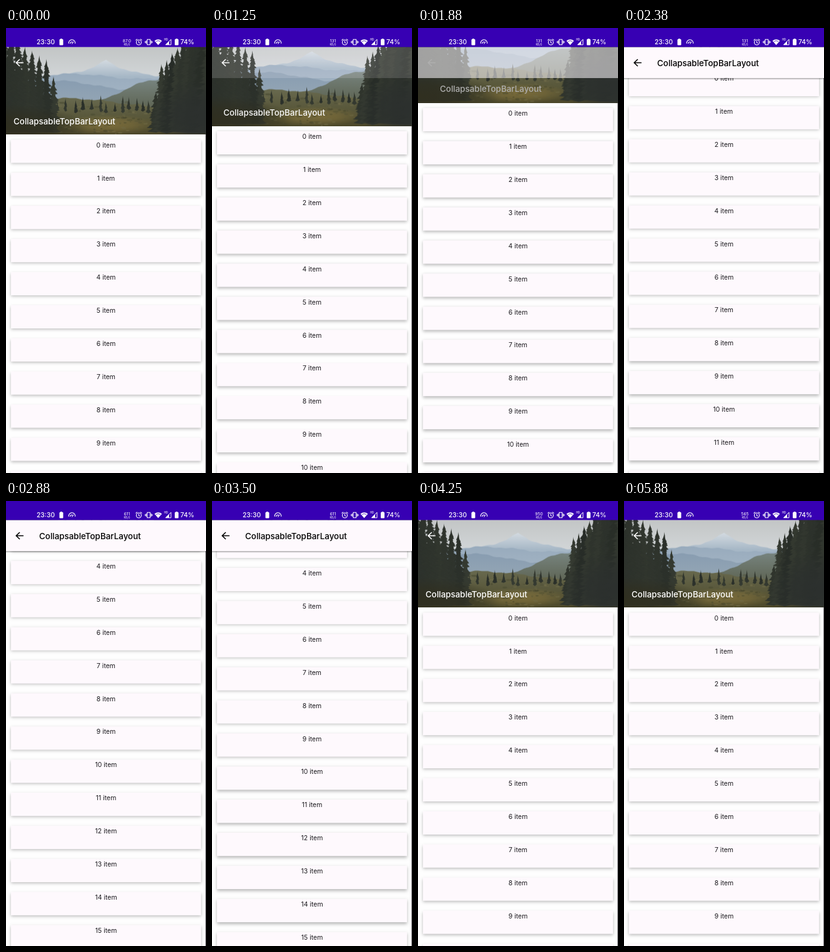
An HTML page with a canvas for the animation above (6.01 s loop, 320 by 711 pixels).

```html
<!DOCTYPE html>
<html lang="en">
<head>
<meta charset="utf-8">
<title>Collapsing top bar</title>
<style>
html, body { margin: 0; width: 100%; height: 100%; overflow: hidden; background: #fff; }
canvas { display: block; width: 100vw; height: 100vh; }
</style>
</head>
<body>
<canvas id="stage"></canvas>
<script>
const W = 320, H = 711, LOOP = 6010, TICK = 125;
const STATUS_H = 30.4, BAR_BOTTOM = 80, HEADER_BOTTOM = 170, RANGE = HEADER_BOTTOM - BAR_BOTTOM;
const PITCH = 52.9, SURFACE = '#fef9fd', PURPLE = '#3700b3', WHITE = '#fff';
const FONT = 'Inter, Roboto, sans-serif';
const TAU = Math.PI * 2;

const canvas = document.getElementById('stage');
const scale = Math.max(1, window.devicePixelRatio || 1);
canvas.width = W * scale;
canvas.height = H * scale;
const ctx = canvas.getContext('2d');

const lerp = (a, b, u) => a + (b - a) * u;
const smooth = u => u * u * (3 - 2 * u);
const progress = (tick, from, to) => Math.min(1, Math.max(0, (tick - from) / (to - from)));

// Slow drag after a touch jump, a fling down the list, then a fling back to the top.
function scrollAt(tick) {
  if (tick < 10) return 0;
  const drag = lerp(13.5, 50.5, progress(tick, 10, 15)) + 56 * progress(tick, 15, 19);
  const down = lerp(drag, 316, smooth(progress(tick, 19, 24)));
  return lerp(down, 0, smooth(progress(tick, 27, 32)));
}

function speedAt(tick) {
  return tick < 3 ? '87.0' : tick < 20 ? '131' : tick < 33 ? '611' : tick < 46 ? '950' : '565';
}

function seeded(seed) {
  return () => (seed = (seed * 16807) % 2147483647) / 2147483647;
}

function text(str, x, y, size, color, weight = 400, align = 'left') {
  ctx.font = `${weight} ${size}px ${FONT}`;
  ctx.textAlign = align;
  ctx.fillStyle = color;
  ctx.fillText(str, x, y);
}

function stroke(color, width, trace) {
  ctx.strokeStyle = color;
  ctx.lineWidth = width;
  ctx.beginPath();
  trace();
  ctx.stroke();
}

function line(...xy) {
  ctx.moveTo(xy[0], xy[1]);
  for (let i = 2; i < xy.length; i += 2) ctx.lineTo(xy[i], xy[i + 1]);
}

function fade(c, y0, y1, top, bottom) {
  const g = c.createLinearGradient(0, y0, 0, y1);
  g.addColorStop(0, top);
  g.addColorStop(1, bottom);
  return g;
}

function ridge(c, fill, height) {
  c.fillStyle = fill;
  c.beginPath();
  c.moveTo(0, HEADER_BOTTOM);
  for (let x = 0; x <= W; x += 2) {
    c.lineTo(x, height(x) + Math.sin(x / 9) * 0.9 + Math.sin(x / 3.1) * 0.5);
  }
  c.lineTo(W, HEADER_BOTTOM);
  c.fill();
}

function glow(c, x, y, rx, ry, rgb, alpha) {
  c.save();
  c.translate(x, y);
  c.scale(rx, ry);
  const g = c.createRadialGradient(0, 0, 0, 0, 0, 1);
  g.addColorStop(0, `rgba(${rgb},${alpha})`);
  g.addColorStop(0.5, `rgba(${rgb},${alpha * 0.7})`);
  g.addColorStop(1, `rgba(${rgb},0)`);
  c.fillStyle = g;
  c.fillRect(-1, -1, 2, 2);
  c.restore();
}

function conifer(c, rnd, x, top, base, spread) {
  const shade = rnd() * 14;
  c.fillStyle = `rgb(${40 + shade},${45 + shade},${40 + shade * 0.7})`;
  for (let y = top; y < base; y += 3) {
    const w = spread * Math.pow((y - top) / (base - top), 0.6) + 1;
    const l = w * lerp(0.5, 1.15, rnd()), r = w * lerp(0.5, 1.15, rnd());
    c.beginPath();
    c.moveTo(x, y - 3);
    c.lineTo(x + r, y + 3 + rnd() * 2);
    c.lineTo(x, y + 6);
    c.lineTo(x - l, y + 3 + rnd() * 2);
    c.fill();
  }
}

// A row of trees growing taller from the clearing towards the picture's edge.
function grove(c, rnd, count, inner, outer, low, high, spread) {
  for (let i = 0; i < count; i++) {
    const u = i / (count - 1);
    const top = lerp(low, high, Math.sqrt(u)) + (rnd() - 0.5) * 12;
    conifer(c, rnd, lerp(inner, outer, u), top, 162, spread * lerp(0.6, 1.2, u));
  }
}

// Landscape in soft tones behind the expanded header.
function paintScene() {
  const layer = document.createElement('canvas');
  layer.width = W * scale;
  layer.height = (HEADER_BOTTOM - STATUS_H) * scale;
  const c = layer.getContext('2d');
  c.scale(scale, scale);
  c.translate(0, -STATUS_H);
  const rnd = seeded(71);

  c.fillStyle = fade(c, 31, 80, '#c3c6c6', '#d2d6d8');
  c.fillRect(0, 0, W, HEADER_BOTTOM);
  ridge(c, fade(c, 51, 78, '#d3dae0', '#a6b7c6'), x => 80 - 29 * Math.exp(-Math.abs(x - 160) / 42));
  ridge(c, fade(c, 72, 105, '#98abbd', '#a2b3c3'), x => 77 + 4 * Math.cos(x / 34));
  ridge(c, fade(c, 85, 122, '#899db1', '#94a6b5'), x => 91 + 7 * Math.cos(x / 38 + 1));
  ridge(c, fade(c, 82, 122, '#77847f', '#62695a'), x => 122 - 40 * smooth(progress(x, 120, 245)));
  ridge(c, fade(c, 115, 170, '#66674c', '#4c4829'), x => 120 - 8 * Math.sin(x / 60));
  glow(c, 165, 154, 75, 16, '140,120,62', 0.65);

  for (let i = 0; i < 130; i++) {
    const y = lerp(118, 170, rnd()), light = rnd();
    c.fillStyle = `rgba(${lerp(52, 130, light)},${lerp(55, 124, light)},${lerp(35, 84, light)},.4)`;
    c.beginPath();
    c.ellipse(lerp(70, 260, rnd()), y, 1 + rnd() * 4, 0.6 + rnd() * 1.2, 0, 0, TAU);
    c.fill();
  }
  for (let x = 82; x < 250; x += 5 + rnd() * 13) {
    const base = 125 + rnd() * 6;
    conifer(c, rnd, x, base - 6 - rnd() * 14, base, 3);
  }

  grove(c, rnd, 8, 76, -4, 84, 12, 20);
  grove(c, rnd, 11, 240, 326, 100, -12, 23);
  glow(c, 5, 160, 125, 38, '48,47,32', 1);
  glow(c, 315, 140, 85, 58, '44,48,46', 1);
  return layer;
}

const scene = paintScene();

function drawList(scroll) {
  ctx.fillStyle = '#fefefe';
  ctx.fillRect(0, STATUS_H, W, H - STATUS_H);
  for (let i = 0; i < 20; i++) {
    const top = 178.3 + i * PITCH - scroll;
    if (top < 20 || top > H + 10) continue;
    ctx.save();
    ctx.shadowColor = 'rgba(0,0,0,.27)';
    ctx.shadowBlur = 5 * scale;
    ctx.shadowOffsetY = (1.2 + 1.6 * top / H) * scale;
    ctx.fillStyle = SURFACE;
    ctx.fillRect(8, top, 304, 37.2);
    ctx.restore();
    text(`${i} item`, W / 2, top + 12.3, 10.5, '#1c1b1f', 400, 'center');
  }
  ctx.fillStyle = '#77757a';
  ctx.fillRect(319, STATUS_H, 1, H - STATUS_H);
}

function drawHeader(scroll) {
  const p = Math.min(1, scroll / RANGE), shift = p * RANGE;

  if (p === 1) {
    ctx.fillStyle = fade(ctx, BAR_BOTTOM, BAR_BOTTOM + 3, 'rgba(0,0,0,.35)', 'rgba(0,0,0,0)');
    ctx.fillRect(0, BAR_BOTTOM, W, 3);
  }

  ctx.drawImage(scene, 0, STATUS_H - shift, W, HEADER_BOTTOM - STATUS_H);
  ctx.globalAlpha = p;
  ctx.fillStyle = SURFACE;
  ctx.fillRect(0, STATUS_H, W, BAR_BOTTOM - STATUS_H);
  ctx.globalAlpha = 1;

  const v = Math.round(255 * (1 - p * p));
  const ink = `rgb(${v},${v},${v})`;
  stroke(ink, 1.6, () => {
    line(28, 55.5, 16.5, 55.5);
    line(22, 50, 16.3, 55.5, 22, 61);
  });
  text('CollapsableTopBarLayout', 12 + 41 * p, 153.8 - 93 * p, 13.4, ink, 500);
}

function drawBattery(x) {
  ctx.fillStyle = WHITE;
  ctx.fillRect(x + 1.5, 17, 3, 1.5);
  ctx.beginPath();
  ctx.roundRect(x, 18, 6, 9.5, 1);
  ctx.fill();
}

function drawGauge(x, y) {
  stroke(WHITE, 1.1, () => {
    ctx.arc(x, y, 5.2, Math.PI * 0.95, Math.PI * 2.05);
    ctx.moveTo(x - 2.7, y + 1);
    ctx.arc(x, y + 1, 2.7, Math.PI, Math.PI * 1.6);
    line(x, y + 1.5, x + 2.5, y - 2.2);
  });
}

function drawAlarm(x, y) {
  stroke(WHITE, 1.1, () => {
    ctx.arc(x, y, 4, 0, TAU);
    line(x, y - 2.5, x, y + 0.3, x + 1.8, y + 1.4);
    for (const d of [-1, 1]) line(x + d * 5, y - 3.3, x + d * 2.5, y - 5.4);
  });
}

function drawVibrate(x, y) {
  stroke(WHITE, 1.1, () => {
    ctx.rect(x - 2.3, y - 4.2, 4.6, 8.4);
    for (const d of [-1, 1]) {
      line(x + d * 3.9, y - 2.5, x + d * 3.9, y + 2.5);
      line(x + d * 5.5, y - 1.5, x + d * 5.5, y + 1.5);
    }
  });
}

function drawWifi(x, y) {
  ctx.fillStyle = WHITE;
  ctx.beginPath();
  ctx.moveTo(x, y);
  ctx.arc(x, y, 9, Math.PI * 1.27, Math.PI * 1.73);
  ctx.fill();
  stroke(PURPLE, 0.8, () => ctx.arc(x, y - 1.8, 5, Math.PI * 1.23, Math.PI * 1.77));
}

function drawSignal(x, y, size) {
  text('HD', x - 8, y - 7, 4.2, WHITE, 500, 'center');
  stroke(WHITE, 1, () => {
    line(x, y - size, x, y, x - size, y);
    ctx.closePath();
  });
  ctx.fillStyle = WHITE;
  ctx.beginPath();
  line(x - size, y, x - 3, y - size + 3, x - 3, y);
  ctx.fill();
}

function drawStatus(tick) {
  ctx.fillStyle = PURPLE;
  ctx.fillRect(0, 0, W, STATUS_H);
  text('23:30', 49, 26, 10.3, WHITE, 500);
  drawBattery(85.5);
  drawGauge(105.5, 24);
  text(speedAt(tick), 193.5, 22.7, 6.8, WHITE, 400, 'center');
  text('KB/S', 193.5, 28, 4.4, WHITE, 400, 'center');
  drawAlarm(212.5, 23);
  drawVibrate(228.3, 22.5);
  drawWifi(243.5, 27.3);
  drawSignal(264, 26.8, 8.6);
  drawBattery(270);
  text('74%', 279, 26, 10.3, WHITE, 500);
}

function frame(time) {
  const tick = Math.floor((time % LOOP + 1) / TICK);
  const scroll = scrollAt(tick);
  ctx.setTransform(scale, 0, 0, scale, 0, 0);
  drawList(scroll);
  drawHeader(scroll);
  drawStatus(tick);
}

let start = null;
function loop(now) {
  if (start === null) start = now;
  frame(now - start);
  requestAnimationFrame(loop);
}
frame(0);
requestAnimationFrame(loop);
</script>
</body>
</html>
```
